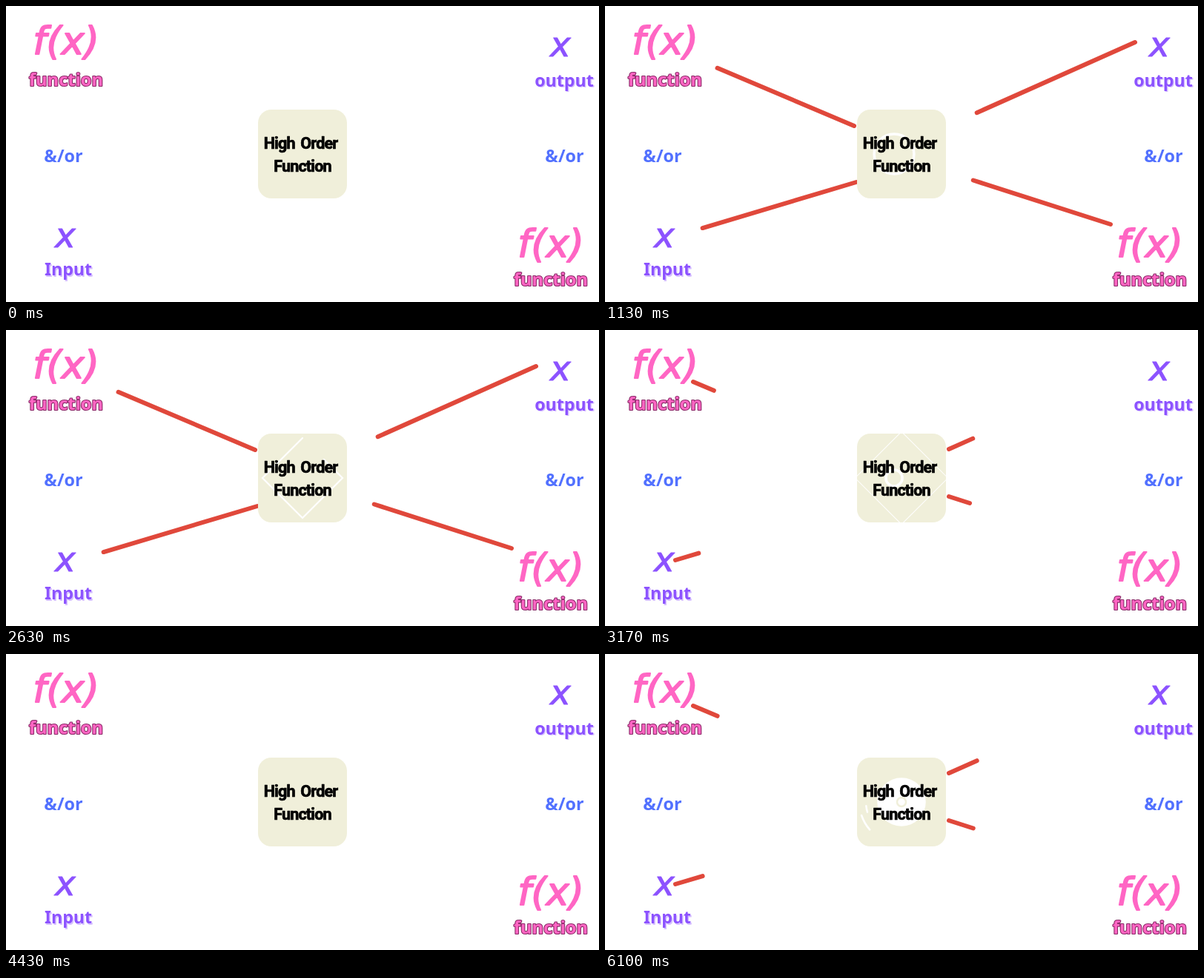
Write an HTML page that moves like this. It is 800 px wide and 400 px high and loops after 6.13 s.

```html
<!DOCTYPE html>
<html lang="en">
<head>
<meta charset="utf-8">
<title>High Order Function</title>
<style>
  html, body { margin: 0; width: 100%; height: 100%; overflow: hidden; background: #fff; }
  svg { display: block; width: 100vw; height: 100vh; }
  text { text-anchor: middle; font: 700 23.4px "Noto Sans", "Open Sans", sans-serif; }
  .sym { font: italic 400 47px "DejaVu Sans", sans-serif; stroke-width: 1; stroke-linejoin: round; }
  .fx { font-size: 52px; fill: #ff66c4; stroke: #ff66c4; stroke-width: 1.8; }
  .x { fill: #8c52ff; stroke: #8c52ff; }
  .fn { font-size: 23.7px; fill: #ff66c4; stroke: #8a2a68; stroke-width: 2.2; paint-order: stroke; stroke-linejoin: round; }
  .io { font-size: 23.2px; fill: #8c52ff; text-shadow: 1.5px 1.5px 0 #d6c0ff; }
  .or { fill: #5271ff; }
  .mid { font: 700 21.5px Roboto, "Open Sans", sans-serif; letter-spacing: -.8px; word-spacing: 3px; stroke: #000; stroke-width: .7; stroke-linejoin: round; }
  #lines { stroke: #e0483b; stroke-width: 6; stroke-linecap: round; }
  #icon { fill: none; stroke: #fff; stroke-linecap: round; }
</style>
</head>
<body>
<svg viewBox="0 0 800 400">
  <clipPath id="tile"><rect x="340" y="140" width="120" height="120" rx="18"/></clipPath>
  <text class="sym fx" x="81" y="64.5">f(x)</text>
  <text class="fn" x="81" y="108">function</text>
  <text class="or" x="77.5" y="211">&amp;/or</text>
  <text class="sym x" x="80" y="326">x</text>
  <text class="io" x="84" y="364">Input</text>
  <text class="sym x" x="748" y="68">x</text>
  <text class="io" x="753" y="108.5">output</text>
  <text class="or" x="753.5" y="211">&amp;/or</text>
  <text class="sym fx" x="735" y="338.5">f(x)</text>
  <text class="fn" x="735" y="378">function</text>
  <g id="lines"></g>
  <g clip-path="url(#tile)">
    <rect x="340" y="140" width="120" height="120" fill="#f0efda"/>
    <g id="icon">
      <path id="diamond" d="M400 146L346 200L400 254L454 200Z" pathLength="1"/>
      <circle id="ring" cy="200"/>
      <circle id="disc" cx="400" cy="200" fill="#fff" stroke="none"/>
      <circle id="hole" cx="400" cy="200" r="6" stroke="#f0efda" stroke-width="2.5"/>
      <path id="outer" stroke-width="2.5"/>
      <path id="inner" stroke-width="2.5"/>
    </g>
  </g>
  <text class="mid" x="397.5" y="192.5">High Order</text>
  <text class="mid" x="400" y="223.5">Function</text>
</svg>
<script>
const LOOP = 6130, SWEEP = 300, ICON = 71;
const growAt = [128, 1601, 3101, 4566, 6025];
const eraseAt = [1055, 2555, 4020, 5479];
const ends = [[119, 70, 336, 162], [95, 311, 339, 238], [464, 161, 715, 49], [464, 225, 682, 295]];

const $ = id => document.getElementById(id);
const set = (el, attrs) => { for (const k in attrs) el.setAttribute(k, attrs[k]); };
const clamp = v => Math.min(1, Math.max(0, v));
const span = (t, a, b) => clamp((t - a) / (b - a));
const mix = (a, b, u) => a + (b - a) * u;
const ease = u => (1 - Math.cos(Math.PI * u)) / 2;
const show = (el, on) => set(el, { visibility: on ? "visible" : "hidden" });

const lines = ends.map(() => $("lines").appendChild(
  document.createElementNS("http://www.w3.org/2000/svg", "line")));

// Each stroke grows from its left end, rests, then vanishes from that same end.
function drawLines(t) {
  const i = growAt.findLastIndex(s => s <= t);
  const head = i < 0 ? 0 : ease(clamp((t - growAt[i]) / SWEEP));
  const tail = eraseAt[i] === undefined ? 0 : ease(clamp((t - eraseAt[i]) / SWEEP));
  lines.forEach((el, n) => {
    const [x1, y1, x2, y2] = ends[n];
    show(el, head - tail > 0.004);
    set(el, {
      x1: mix(x1, x2, tail), y1: mix(y1, y2, tail),
      x2: mix(x1, x2, head), y2: mix(y1, y2, head)
    });
  });
}

function arc(r, from, to) {
  const point = deg => {
    const a = deg * Math.PI / 180;
    return `${400 + r * Math.cos(a)} ${200 + r * Math.sin(a)}`;
  };
  return `M${point(from)}A${r} ${r} 0 0 0 ${point(to)}`;
}

// White figure behind the title: diamond, ring, then a shining disc.
function drawIcon(p) {
  const spread = span(p, 10, 25);
  const drawn = span(p, 1, 9);
  const scale = mix(1, 1.17, spread);
  show($("diamond"), p > 1 && p < 28);
  set($("diamond"), {
    "stroke-dasharray": `${drawn} 2`,
    "stroke-width": mix(2.2, 0.8, spread),
    transform: `translate(400 200) scale(${scale}) translate(-400 -200)`
  });

  const toDisc = span(p, 35, 39);
  show($("ring"), p > 21 && p < 39);
  set($("ring"), {
    cx: mix(390, 400, toDisc),
    r: mix(mix(6, 27, span(p, 21, 34)), 30, toDisc),
    "stroke-width": mix(3.5, 6, toDisc)
  });

  const r = p < 41 ? mix(27, 33, span(p, 37, 41)) : mix(33, 0, span(p, 41, 45));
  show($("disc"), p > 37 && p < 45);
  show($("hole"), p > 38 && p < 44);
  set($("disc"), { r, opacity: span(p, 37, 39) });

  const turn = p - 41;
  const shine = p > 39 && p < 46;
  show($("outer"), shine);
  show($("inner"), shine);
  set($("outer"), { d: arc(mix(57, 52, clamp(turn)), 162 - 16 * turn, 140 - 38 * turn) });
  set($("inner"), { d: arc(48, 174 - 6 * turn, 164 - 16 * turn) });
}

function frame(now) {
  const t = now % LOOP;
  drawLines(t);
  drawIcon(t * 0.03 % ICON);
  requestAnimationFrame(frame);
}
frame(performance.now());
</script>
</body>
</html>
```
